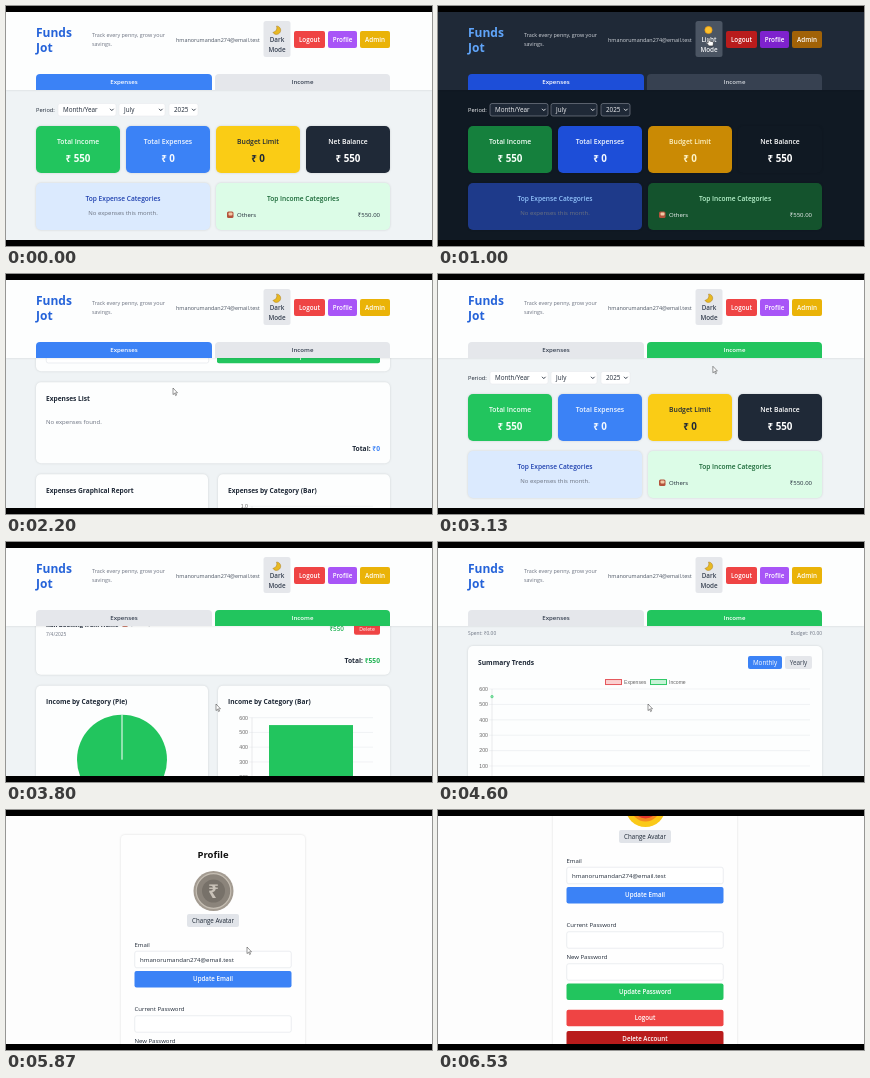
Recreate the animation shown at these times as an HTML page. Size 426 px wide and 240 px high, loop 6.59 s.

```html
<!DOCTYPE html>
<html lang="en">
<head>
<meta charset="utf-8">
<title>Budget tracker</title>
<style>
html, body { margin: 0; width: 100%; height: 100%; overflow: hidden; background: #000; }
svg { display: block; width: 100vw; height: 100vh; font-family: "Open Sans", "Noto Sans", sans-serif;
  --page: #eff3f5; --head: #fdfefe; --ink: #1f2937; --soft: #6b7280; --brand: #2563d9; --mail: #4b5563;
  --green: #22c55e; --blue: #3b82f6; --yellow: #facc15; --navy: #1f2937; --red: #ef4444;
  --purple: #a855f7; --gold: #eab308; --btn: #e5e7eb; --btnInk: #374151;
  --sky: #dbeafe; --skyInk: #1e40af; --mint: #dcfce7; --mintInk: #166534;
  --field: #fff; --edge: #e5e7eb; --limit: #1f2937; --idle: #e5e7eb; --idleInk: #374151;
  --tabE: var(--blue); --inkE: #fff; --tabI: var(--idle); --inkI: var(--idleInk); }
svg.dark { --page: #101923; --head: #1f2937; --ink: #f3f4f6; --soft: #d1d5db; --brand: #60a5fa; --mail: #d1d5db;
  --green: #15803d; --blue: #1d4ed8; --yellow: #ca8a04; --navy: #101923; --red: #b91c1c;
  --purple: #7e22ce; --gold: #a16207; --btn: #4b5563; --btnInk: #f3f4f6;
  --sky: #1e3a8a; --skyInk: #93c5fd; --mint: #14532d; --mintInk: #bbf7d0;
  --field: #1f2937; --edge: #9ca3af; --limit: #fef3c7; --idle: #374151; --idleInk: #d1d5db; }
svg.income { --tabE: var(--idle); --inkE: var(--idleInk); --tabI: var(--green); --inkI: #fff; }
.card { filter: drop-shadow(0 .6px 1px #0002); }
.axis { font-family: "Liberation Sans", Arial, sans-serif; }
</style>
</head>
<body>
<svg id="stage" viewBox="0 0 426 240" preserveAspectRatio="none"></svg>
<script>
const LOOP = 6590;
const EMAIL = 'hmanorumandan274@email.test';
const stage = document.getElementById('stage');

const rect = (x, y, w, h, fill, r = 0, more = '') =>
  `<rect x="${x}" y="${y}" width="${w}" height="${h}" rx="${r}" style="fill:${fill}" ${more}/>`;
const text = (x, y, s, size, fill = 'var(--ink)', weight = 400, anchor = 'start', cls = '') =>
  `<text x="${x}" y="${y + size * .36}" font-size="${size}" font-weight="${weight}" text-anchor="${anchor}" class="${cls}" style="fill:${fill}">${s}</text>`;
const mid = (x, y, s, size, fill, weight = 600) => text(x, y, s, size, fill, weight, 'middle');
const button = (x, y, w, h, s, fill, ink = '#fff', size = 6.3, weight = 600) =>
  rect(x, y, w, h, fill, 2) + mid(x + w / 2, y + h / 2, s, size, ink, weight);
const card = (x, y, w, h) => rect(x, y, w, h, '#fdfefe', 5, 'class="card"');
const field = (x, y, w, h) => rect(x + .25, y + .25, w - .5, h - .5, 'var(--field)', 2, 'style2="" stroke="#dfe3e8" stroke-width=".6"').replace('style2="" ', '');
const line = (x1, y1, x2, y2, color = '#e3e5e8') =>
  `<path d="M${x1} ${y1}L${x2} ${y2}" stroke="${color}" stroke-width=".5"/>`;
const circle = (x, y, r, fill, more = '') => `<circle cx="${x}" cy="${y}" r="${r}" fill="${fill}" ${more}/>`;

function select(x, w, s) {
  const c = x + w - 6;
  return rect(x, 97.5, w, 12.5, 'var(--field)', 2).replace('style="', 'stroke-width=".5" style="stroke:var(--edge);') +
    text(x + 5, 103.7, s, 6.3) +
    `<path d="M${c} 102.8l1.8 1.8l1.8-1.8" fill="none" stroke-width=".9" style="stroke:var(--ink)"/>`;
}

// Horizontal grid with labels, highest value first
function grid(x1, x2, top, step, labels) {
  return labels.map((s, i) => line(x1 - 3, top + i * step, x2, top + i * step) +
    text(x1 - 4, top + i * step, s, 5.2, '#666', 400, 'end', 'axis')).join('') +
    line(x1, top, x1, top + step * (labels.length - 1), '#d5d7da');
}

const hundreds = [600, 500, 400, 300, 200, 100, 0];

function overview() {
  const tile = (i, title, value, fill, ink) => rect(30 + 90 * i, 120, 84, 47, fill, 5, 'class="card"') +
    mid(72 + 90 * i, 136, title, 6.8, ink) + mid(72 + 90 * i, 152, '₹ ' + value, 9.8, ink, 700);
  return text(30, 104, 'Period:', 5.7) +
    select(52, 58, 'Month/Year') + select(113, 46, 'July') + select(163, 29, '2025') +
    tile(0, 'Total Income', 550, 'var(--green)', '#f5fff8') +
    tile(1, 'Total Expenses', 0, 'var(--blue)', '#f3f8ff') +
    tile(2, 'Budget Limit', 0, 'var(--yellow)', 'var(--limit)') +
    tile(3, 'Net Balance', 550, 'var(--navy)', '#fff') +
    rect(30, 177, 174, 47, 'var(--sky)', 5, 'class="card"') + mid(117, 193, 'Top Expense Categories', 6.6, 'var(--skyInk)') +
    mid(117, 207, 'No expenses this month.', 6, '#6b7280', 400) +
    rect(210, 177, 174, 47, 'var(--mint)', 5, 'class="card"') + mid(297, 193, 'Top Income Categories', 6.6, 'var(--mintInk)') +
    rect(221, 205.5, 6.5, 6.5, '#b4533c', 1.5) + rect(222.5, 206.5, 4, 3, '#f1c9a5', 1) +
    text(231, 209, 'Others', 6) + text(374, 209, '₹550.00', 6, 'var(--ink)', 400, 'end');
}

function trends() {
  const key = (x, s, fill, edge) => rect(x + .5, 321.5, 16, 5, fill, 0, `stroke="${edge}"`) +
    text(x + 19, 324, s, 5.1, '#666', 400, 'start', 'axis');
  return text(30, 250, 'Budget Usage', 6.6, 'var(--ink)', 600) + rect(30, 261, 354, 6, '#e0e4e8', 3) +
    text(30, 275, 'Spent: ₹0.00', 4.9, '#6b7280') + text(384, 275, 'Budget: ₹0.00', 4.9, '#6b7280', 400, 'end') +
    card(30, 288, 354, 167) + text(40, 305, 'Summary Trends', 6.7, 'var(--ink)', 700) +
    button(310, 298, 34, 13, 'Monthly', 'var(--blue)', '#fff', 6.3, 400) +
    button(347, 298, 27, 13, 'Yearly', '#e5e7eb', '#374151', 6.3, 400) +
    key(167, 'Expenses', '#fbd0d0', '#e5575c') + key(212, 'Income', '#c8f3d7', '#2fc866') +
    grid(54, 372, 331, 15.4, hundreds) + circle(54, 338.6, 1.3, '#86dfa8', 'stroke="#22c55e" stroke-width=".4"') +
    mid(54, 431, 'Jul', 5, '#666', 400);
}

function form(kind) {
  const hint = (x, y, s) => field(x, y, 163, 15) + text(x + 5, y + 7.5, s, 6, '#6b7280');
  return card(30, 466, 354, 134) + text(40, 482, 'Add ' + kind, 6.7, 'var(--ink)', 700) +
    hint(40, 502, 'Title') + hint(211, 502, 'Amount') + hint(40, 540, 'Date') + hint(211, 540, 'Category') +
    hint(40, 577, 'Notes') + button(211, 577, 163, 15, 'Add ' + kind, '#22c55e');
}

const total = (y, n, color) =>
  text(374, y, `Total: <tspan style="fill:${color}">₹${n}</tspan>`, 6.7, 'var(--ink)', 700, 'end');

function charts(y, left, right, labels, step) {
  return card(30, y, 172, 145) + card(212, y, 172, 145) +
    text(40, y + 16, left, 6.6, 'var(--ink)', 700) + text(222, y + 16, right, 6.6, 'var(--ink)', 700) +
    grid(246, 367, y + 32, step, labels);
}

const expenses = () => form('Expense') + card(30, 611, 354, 81) +
  text(40, 627, 'Expenses List', 6.6, 'var(--ink)', 700) + text(40, 651, 'No expenses found.', 6, '#6b7280') +
  total(677.5, 0, '#3b82f6') +
  charts(703, 'Expenses Graphical Report', 'Expenses by Category (Bar)',
    Array.from({length: 11}, (_, i) => (1 - i / 10).toFixed(1)), 8.85);

const income = () => form('Income') + card(30, 611, 354, 87) +
  text(40, 627, 'Income List', 6.6, 'var(--ink)', 700) +
  text(40, 648, 'Rail Booking from Home', 6, 'var(--ink)', 700) + rect(116, 645, 6, 5, '#b4533c', 1.5) +
  text(125, 648, '(Others)', 5, '#9ca3af') +
  text(40, 658, '7/4/2025', 4.9, '#6b7280') + text(338, 652, '₹550', 6.4, '#22b455', 600, 'end') +
  button(348, 647, 26, 11, 'Delete', '#ef4444', '#fff', 5.2, 400) + total(684, 550, '#22b455') +
  charts(709, 'Income by Category (Pie)', 'Income by Category (Bar)', hundreds, 14.75) +
  circle(116, 783, 45, '#22c55e') + `<path d="M116 783v-45" stroke="#fff"/>` +
  rect(263, 748.4, 84, 81.1, '#22c55e') + mid(305, 836, 'Others', 5, '#666', 400);

function header() {
  const tab = (x, w, s, k) => `<path d="M${x} 84v-12a4 4 0 0 1 4-4h${w - 8}a4 4 0 0 1 4 4v12z" style="fill:var(--tab${k})"/>` +
    mid(x + w / 2, 76, s, 6.1, `var(--ink${k})`);
  return rect(0, 6, 426, 78, 'var(--head)', 0, 'class="card"') +
    text(30, 27, 'Funds', 12, 'var(--brand)', 700) + text(30, 41.7, 'Jot', 12, 'var(--brand)', 700) +
    text(86, 29.5, 'Track every penny, grow your', 5.4, 'var(--soft)') + text(86, 37.8, 'savings.', 5.4, 'var(--soft)') +
    text(170, 33.7, EMAIL, 5.45, 'var(--mail)') +
    rect(257.5, 15, 27, 36, 'var(--btn)', 2.5) +
    `<path id="moon" d="M270.5 20a4.2 4.2 0 1 1-3.6 6.4a4.6 4.6 0 0 0 3.6-6.4z" fill="#e8b923" stroke="#9a6b12" stroke-width=".4"/>` +
    circle(270.5, 24, 3.6, '#fbc02d', 'id="sun" stroke="#f59e0b" stroke-width=".7"') +
    mid(271, 34, '<tspan id="mode"></tspan>', 6.3, 'var(--btnInk)') + mid(271, 43.7, 'Mode', 6.3, 'var(--btnInk)') +
    button(288, 25, 31, 17, 'Logout', 'var(--red)') + button(322, 25, 29, 17, 'Profile', 'var(--purple)') +
    button(354, 25, 30, 17, 'Admin', 'var(--gold)') +
    tab(30, 176, 'Expenses', 'E') + tab(209, 175, 'Income', 'I');
}

function profile() {
  const wide = (y, s, fill) => button(128.5, y, 157, 16.5, s, fill, '#fff', 6.2);
  const label = (y, s) => text(128.5, y, s, 6);
  return rect(115, 25, 184, 310, '#fefefe', 4, 'class="card"') + mid(207, 45, 'Profile', 9.5, '#111', 700) +
    `<g id="coin">${circle(207.5, 81, 20, '#a39b91')}${circle(207.5, 81, 17.3, '#8b847b', 'stroke="#c4bdb2" stroke-width="1.2"')}
     ${circle(207.5, 81, 11.5, '#777169')}${mid(207.5, 81, '₹', 19, '#c9c2b8', 700)}</g>` +
    `<g id="badge">${circle(207.5, 81, 20, '#fac918')}${circle(207.5, 81, 14.5, '#f58a1f')}${circle(207.5, 80, 12.5, '#e5392d')}</g>` +
    button(181, 104, 52, 13, 'Change Avatar', '#e1e4e9', '#1f2937', 6.2, 400) +
    label(135, 'Email') + field(128.5, 141, 157, 17) + text(134, 150, EMAIL, 6.1) + wide(161, 'Update Email', '#3b82f6') +
    label(199.3, 'Current Password') + field(128.5, 205.5, 157, 17) +
    label(231, 'New Password') + field(128.5, 237.5, 157, 17) + wide(257.5, 'Update Password', '#22c55e') +
    wide(283.8, 'Logout', '#ef4444') + wide(305, 'Delete Account', '#b91c1c');
}

stage.innerHTML = `
<defs><clipPath id="screen"><rect y="6" width="426" height="228"/></clipPath></defs>
<rect width="426" height="240"/>
<g clip-path="url(#screen)">
  <g id="home">${rect(0, 6, 426, 228, 'var(--page)')}
    <g id="content">${overview()}${trends()}<g id="exp">${expenses()}</g><g id="inc">${income()}</g></g>
    ${header()}</g>
  <g id="account">${rect(0, 6, 426, 228, '#fdfdfd')}<g id="sheet">${profile()}</g></g>
  <g id="cursor" stroke-width=".5" stroke-linejoin="round">
    <path id="arrow" d="M0 0v6.6l1.5-1.4l1.1 2.4l1-.5l-1.1-2.3h2z" fill="#fff" stroke="#333"/>
    <path id="hand" d="M-.8.5q.8-.9 1.6 0v2.6l3 .7q.8.3.7 1.2l-.5 2.9h-4l-2.3-3q0-1 1.5-.3z" fill="#fff" stroke="#111"/>
  </g>
</g>`;

const el = id => document.getElementById(id);
const show = (id, on) => el(id).style.display = on ? '' : 'none';

// Piecewise linear value from [time, ...values] keys
function at(keys, t, n = 1) {
  const i = keys.findIndex(k => k[0] > t);
  if (i === 0) return keys[0][n];
  if (i < 0) return keys[keys.length - 1][n];
  const a = keys[i - 1], b = keys[i];
  return a[n] + (b[n] - a[n]) * (t - a[0]) / (b[0] - a[0]);
}

const homeScroll = [[1430, 0], [1750, 200], [2000, 380], [2200, 502], [2350, 615], [2670, 0],
  [3370, 0], [3800, 565], [4000, 630], [4200, 615], [4600, 185], [4780, 0]];
const sheetScroll = [[6270, 0], [6500, 84]];
const pointer = [[200, 232, 110], [400, 271, 32], [1330, 271, 32], [1650, 167, 114], [2670, 167, 114],
  [2900, 290, 76], [3080, 290, 76], [3350, 210, 162], [4780, 210, 162], [5150, 336, 33],
  [5480, 336, 33], [5800, 241, 137], [6030, 241, 137], [6170, 207, 110]];
const hovers = [[350, 1370], [2880, 3120], [5130, 5470], [6140, 6300]];

function draw(now) {
  const t = now % LOOP;
  const dark = t >= 470 && t < 1200, inc = t >= 3000, account = t >= 5470, changed = t >= 6200;
  stage.classList.toggle('dark', dark);
  stage.classList.toggle('income', inc);
  el('mode').textContent = dark ? 'Light' : 'Dark';
  show('moon', !dark);
  show('sun', dark);
  show('exp', !inc);
  show('inc', inc);
  show('home', !account);
  show('account', account);
  show('coin', !changed);
  show('badge', changed);
  el('content').setAttribute('transform', `translate(0 ${-at(homeScroll, t)})`);
  el('sheet').setAttribute('transform', `translate(0 ${-at(sheetScroll, t)})`);
  const hand = hovers.some(([a, b]) => t >= a && t < b);
  show('cursor', t >= 200 && t < 6300);
  show('hand', hand);
  show('arrow', !hand);
  el('cursor').setAttribute('transform', `translate(${at(pointer, t)} ${at(pointer, t, 2)})`);
}

const start = performance.now();
function tick() {
  draw(performance.now() - start);
  requestAnimationFrame(tick);
}
tick();
</script>
</body>
</html>
```
